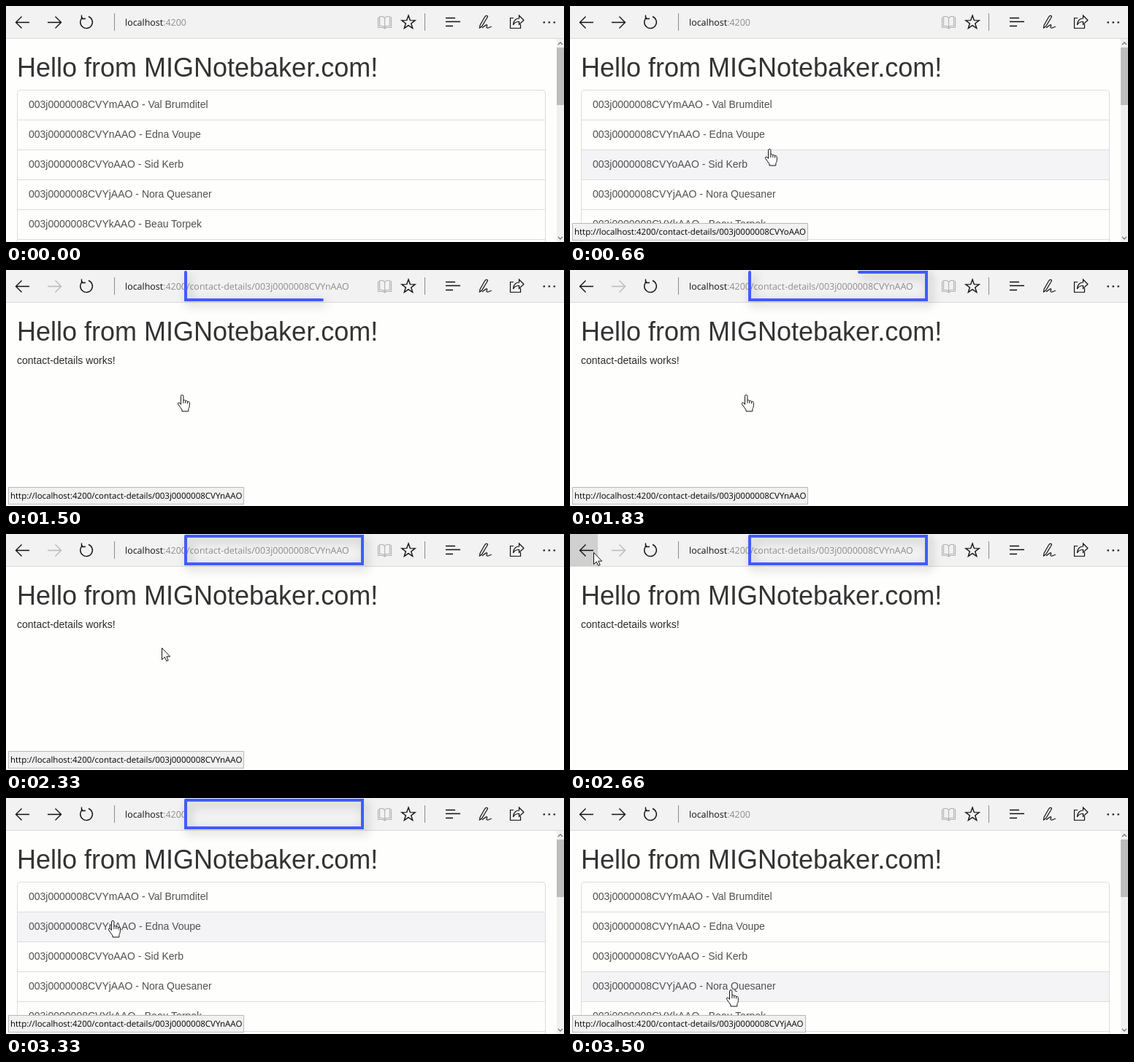
Write an HTML page that moves like this. It is 764 by 324 pixels and loops after 3830 ms.

```html
<!DOCTYPE html>
<html lang="en">
<head>
<meta charset="utf-8">
<title>Contact list</title>
<style>
  html, body { margin: 0; width: 100%; height: 100%; overflow: hidden; background: #fefefd; }
  svg { display: block; }
  text { font: 14px "Liberation Sans", Arial, sans-serif; fill: #2b2b2b; white-space: pre; }
  .title { font-size: 36px; fill: #333; }
  .row text { fill: #505050; }
  .row rect { fill: none; }
  .row.hover rect { fill: #f4f4f6; }
  .rule { stroke: #ddd; fill: none; }
  .url { font: 12.44px "Open Sans", "Noto Sans", sans-serif; fill: #111; text-rendering: geometricPrecision; }
  .url tspan { fill: #8c8c8c; }
  #status text { font: 11.5px "Open Sans", "Noto Sans", sans-serif; fill: #000; text-rendering: geometricPrecision; }
  #status rect { fill: #f1f1f1; stroke: #b9b9b9; }
  .icons { fill: none; stroke: #111; stroke-width: 1.4; }
  .pointer { fill: #fff; stroke: #111; stroke-linejoin: round; }
  #marker {
    fill: none; stroke: #405bfa; stroke-width: 4; stroke-linecap: round;
    filter: drop-shadow(4px 5px 7px rgba(0, 0, 0, .28));
  }
</style>
</head>
<body>
<svg width="764" height="324" viewBox="0 0 764 324">
  <text class="title" x="15" y="97">Hello from MIGNotebaker.com!</text>

  <g id="list">
    <g id="rows"></g>
    <path class="rule" d="M15.5 324V119.5a4 4 0 0 1 4-4H734.5a4 4 0 0 1 4 4V324"/>
    <rect x="754" y="45" width="10" height="279" fill="#f0f0f0"/>
    <rect x="754" y="57" width="10" height="79" fill="#bdbdbd"/>
    <path d="M756 53l3-3 3 3M756 317l3 3 3-3" fill="none" stroke="#777" stroke-width="1.3"/>
  </g>
  <text id="details" x="15" y="129">contact-details works!</text>

  <rect width="764" height="44" fill="#f2f2f2"/>
  <path d="M0 44.5H764" stroke="#d8d8d8"/>
  <rect id="backHover" width="38" height="44" fill="#d0d0d1"/>
  <g class="icons">
    <path d="M32 22.5H13.5M21.5 14.5l-8 8 8 8"/>
    <path id="forward" d="M57 22.5H75.5M67.5 14.5l8 8-8 8"/>
    <path d="M105 15.7A8.3 8.3 0 1 0 113 14.5M103.500 12.5V17.5H109"/>
    <path d="M148.5 10V34M573.5 10V34" stroke="#8c8c8c" stroke-width="1"/>
    <path d="M518.5 16.5V31M509.5 15.5V29.5H516l2.5 1.5 2.5-1.5H527.5V15.5H527M511.5 27.5V14.5H516l2.5 2 2.5-2H525.5V27.5H521l-2.5 1.5-2.5-1.5Z" stroke="#b4b4b6" stroke-width="1.2"/>
    <path id="star"/>
    <path d="M602 16.5H615M602 21.5H622M602 27.5H612"/>
    <path d="M659.500 14c-1.500-1.500-3-.5-4 1L649 26.500l-.5 3.500 3-2 7-11.500c.8-1.200 1.300-2 1-2.500ZM652 30c3-2 5.500-5 6.500-4s-2 3.500.5 4 2.500-1.500 6-1.500" stroke-width="1.200"/>
    <path d="M695 16.500H690.500V30.500H704.500V25M694.500 26c0-6 4-9 8-9V13l6.500 6.500-6.500 6V21.500c-4 0-6.500 1.500-8 4.500Z" stroke-width="1.200"/>
    <path d="M735.5 22.5h2.5M742.5 22.5h2.5M749.5 22.5h2.5" stroke-width="2.2"/>
  </g>
  <text class="url" x="163" y="27">localhost<tspan id="path"></tspan></text>

  <g id="status"><rect x="3.5" y="298.5" height="23"/><text x="6" y="314"></text></g>
  <path id="marker" d="M246 3V41H488V3H246"/>
  <path id="arrow" class="pointer" d="M.5.5V16.5L4.3 13 6.8 18.5 9.2 17.5 6.8 12.2H11.7Z"/>
  <path id="hand" class="pointer" d="M4.500 13.500V2.200a1.700 1.700 0 0 1 3.400 0V8c1-.9 2.600-.4 2.900.8 1-.8 2.500-.3 2.800.9 1-.6 2.700 0 2.700 1.600V15.500c0 2.500-1.500 3.500-1.500 5V23H6V21C4.500 18.500 2.200 16 .6 13.200c-1-1.600 1-2.800 2.300-1.600ZM7.900 8V12M10.800 8.800V12M13.600 9.700V12.500"/>
</svg>
<script>
const LOOP = 3830;
const $ = id => document.getElementById(id);
const show = (el, on) => { el.style.display = on ? '' : 'none'; };

const contacts = [
  ['m', 'Val Brumditel'],
  ['n', 'Edna Voupe'],
  ['o', 'Sid Kerb'],
  ['j', 'Nora Quesaner'],
  ['k', 'Beau Torpek']
];
const contactId = i => `003j0000008CVY${contacts[i][0]}AAO`;
const detailsPath = i => `:4200/contact-details/${contactId(i)}`;

$('rows').innerHTML = contacts.map(([, name], i) => {
  const y = 41 * i;
  return `<g class="row"><rect x="16" y="${116 + y}" width="722" height="40"/>
    <text x="31" y="${140 + y}">${contactId(i)} - ${name}</text>
    <path class="rule" d="M16 ${156.5 + y}H738"/></g>`;
}).join('');
const rows = [...document.querySelectorAll('.row')];

const starPoints = Array.from({ length: 10 }, (_, i) => {
  const r = i % 2 ? 3.9 : 9.7, a = Math.PI * (i / 5 - 0.5);
  return [551 + r * Math.cos(a), 22.8 + r * Math.sin(a)].map(v => v.toFixed(1));
});
$('star').setAttribute('d', `M${starPoints.join('L')}Z`);

// start time, pointer shape, x, y, index of the link under the pointer
const moves = [
  [0],
  [500, 'arrow', 359, 288],
  [660, 'hand', 267, 196, 2],
  [830, 'hand', 262, 130, 0],
  [1000, 'hand', 259, 168, 1],
  [1160, 'hand', 235, 171, 1],
  [2330, 'arrow', 213, 156, 1],
  [2500, 'arrow', 50, 45],
  [2660, 'arrow', 32, 25],
  [2830, 'arrow', 27, 25],
  [3160, 'arrow', 65, 71],
  [3330, 'hand', 140, 168, 1],
  [3500, 'hand', 214, 263, 3]
];
const within = (t, from, to) => t >= from && t < to;

function drawPointer(shape, x, y) {
  for (const id of ['arrow', 'hand']) {
    show($(id), id === shape);
    if (id === shape) $(id).setAttribute('transform', `translate(${x} ${y})`);
  }
}

function drawStatus(link) {
  const [box, label] = $('status').children;
  show($('status'), link !== undefined);
  if (link === undefined) return;
  label.textContent = 'http://localhost' + detailsPath(link);
  box.setAttribute('width', Math.round(label.getComputedTextLength() + 5));
}

function drawMarker(t) {
  show($('marker'), within(t, 1160, 3500));
  const step = Math.floor((t - 1160) * 3 / 500);
  const length = Math.min(40 + 92.5 * step, 560);
  $('marker').style.strokeDasharray = `${Math.max(length, 0)} 999`;
}

function draw(t) {
  const [, shape, x, y, link] = moves.findLast(m => m[0] <= t);
  const onDetails = within(t, 1500, 3000);
  show($('list'), !onDetails);
  show($('details'), onDetails);
  show($('backHover'), within(t, 2660, 3160));
  $('forward').style.stroke = onDetails ? '#b9b9bb' : '';
  $('path').textContent = onDetails ? detailsPath(1) : ':4200';
  rows.forEach((row, i) => row.classList.toggle('hover', i === link));
  drawPointer(shape, x, y);
  drawStatus(link);
  drawMarker(t);
}

const start = performance.now();
function tick() {
  draw((performance.now() - start) % LOOP);
  requestAnimationFrame(tick);
}
tick();
</script>
</body>
</html>
```
